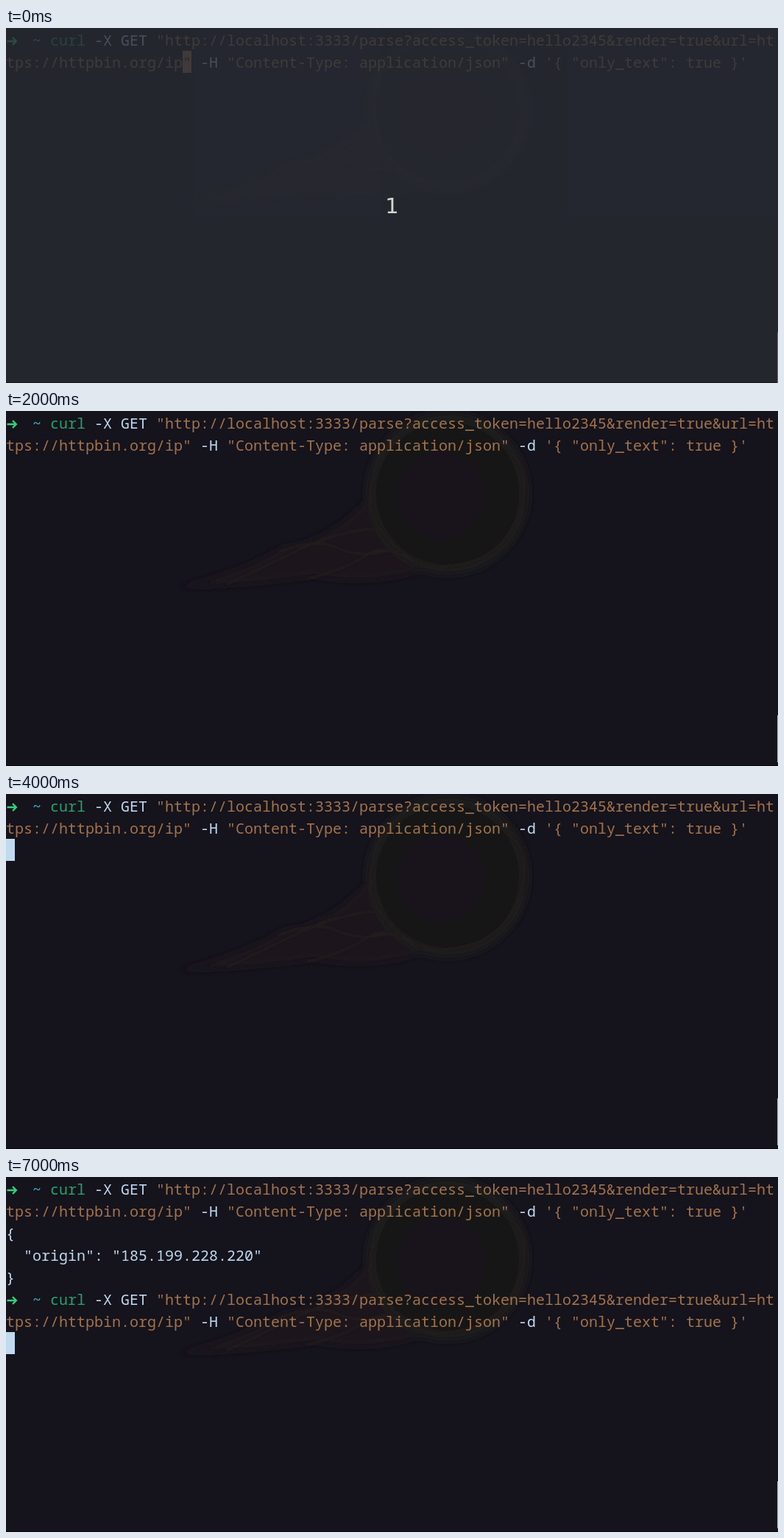
These frames come from a looping animation (1049x483 px, 8 s). An HTML page:

```html
<!DOCTYPE html>
<html lang="en">
<head>
<meta charset="utf-8">
<title>Terminal session</title>
<style>
  html, body { margin: 0; width: 100%; height: 100%; overflow: hidden; background: #15131c; }
  svg { display: block; width: 1049px; height: 483px; }
  text { font: 500 20px "Noto Sans Mono", "DejaVu Sans Mono", monospace; white-space: pre; font-variant-ligatures: none; }
  .count { font: 29px "DejaVu Sans", sans-serif; }
</style>
</head>
<body>
<svg id="stage" viewBox="0 0 1049 483">
  <defs>
    <filter id="soft" x="-20%" y="-20%" width="140%" height="140%"><feGaussianBlur stdDeviation="5"/></filter>
    <filter id="wisp" x="-20%" y="-20%" width="140%" height="140%"><feGaussianBlur stdDeviation="1.3"/></filter>
  </defs>
  <rect width="1049" height="483" fill="#15131c"/>
  <!-- faint wallpaper -->
  <g filter="url(#soft)">
    <path d="M235 240Q330 215 375 185Q440 180 505 105Q505 170 570 215Q500 240 420 225Q330 238 235 240Z" fill="#1d191c"/>
    <circle cx="600" cy="112" r="104" fill="#141217" stroke="#1f1b1c" stroke-width="14"/>
  </g>
  <g filter="url(#wisp)" fill="none" stroke="#211c1c" stroke-width="3">
    <path d="M300 236Q350 212 400 188T500 160M370 192Q420 172 450 186T520 190M410 228Q460 216 490 196T560 212"/>
    <path d="M504 85Q478 130 520 175T600 211Q675 205 697 140T680 55"/>
  </g>
  <circle cx="591" cy="115" r="60" fill="#19131b"/>
  <g id="term"></g>
  <rect y="482" width="1049" height="1" fill="#08070b"/>
  <rect x="1048" y="414" width="1" height="64" fill="#b5b4b2"/>
</svg>
<script>
const LOOP = 8000, CELL = 12, ROW = 30;
const C = {
  bg: '#15131c', fg: '#c0daf0', arrow: '#33d17a', path: '#33b9cc',
  cmd: '#26a269', str: '#a2734c', veil: '#282c34'
};
const stage = document.getElementById('stage');
const term = document.getElementById('term');

function add(parent, tag, attrs, content = '') {
  const el = document.createElementNS('http://www.w3.org/2000/svg', tag);
  for (const k in attrs) el.setAttribute(k, attrs[k]);
  el.textContent = content;
  parent.append(el);
  return el;
}

// Visible only between two times, with hard cuts.
function during(el, from, to) {
  const steps = [[0, from === 0], [from, true], [to, false], [LOOP, to === LOOP]];
  el.animate(
    steps.filter(([t], i) => !(i === 1 && t === 0) && !(i === 2 && t === LOOP))
      .map(([t, on]) => ({ offset: t / LOOP, opacity: on ? 1 : 0, easing: 'step-end' })),
    { duration: LOOP, iterations: Infinity });
  return el;
}

function write(parent, col, row, fill, str) {
  return add(parent, 'text', { x: col * CELL, y: 24 + row * ROW, fill }, str);
}

function block(parent, col, row, fill = C.fg) {
  return add(parent, 'rect', { x: col * CELL, y: 1 + row * ROW, width: CELL, height: ROW, fill });
}

function prompt(parent, row) {
  const y = 18 + row * ROW;
  add(parent, 'path', {
    d: `M1.5 ${y}H14M9 ${y - 4.8}L14 ${y}L9 ${y + 4.8}`,
    fill: 'none', stroke: C.arrow, 'stroke-width': 2.3, 'stroke-linejoin': 'round'
  });
  write(parent, 3, row, C.path, '~');
}

function command(parent, row) {
  write(parent, 5, row, C.cmd, 'curl');
  write(parent, 10, row, C.fg, '-X GET');
  write(parent, 17, row, C.str, '"http://localhost:3333/parse?access_token=hello2345&render=true&url=ht');
  write(parent, 0, row + 1, C.str, 'tps://httpbin.org/ip"');
  write(parent, 22, row + 1, C.fg, '-H');
  write(parent, 25, row + 1, C.str, '"Content-Type: application/json"');
  write(parent, 58, row + 1, C.fg, '-d');
  write(parent, 61, row + 1, C.str, `'{ "only_text": true }'`);
}

prompt(term, 0);
command(term, 0);

const reply = during(add(term, 'g'), 6000, LOOP);
['{', '  "origin": "185.199.228.220"', '}'].forEach((s, i) => write(reply, 0, i + 2, C.fg, s));
prompt(reply, 5);
command(during(add(term, 'g'), 7000, LOOP), 5);

// Cursor: column, row, start, end
[[84, 1, 1000, 2000], [0, 2, 4000, 6000], [5, 5, 6000, 7000], [0, 7, 7000, LOOP]]
  .forEach(([col, row, from, to]) => during(block(term, col, row), from, to));

// Countdown veil before the session starts
const intro = during(add(stage, 'g'), 0, 1000);
block(intro, 20, 1, C.str);
write(intro, 20, 1, C.bg, '"');
add(intro, 'rect', { width: 1049, height: 483, fill: C.veil, 'fill-opacity': 0.8 });
add(intro, 'rect', { x: 1048, y: 414, width: 1, height: 69, fill: '#4a7a5c' });
add(intro, 'rect', { y: 482, width: 1048, height: 1, fill: '#17181e' });
add(intro, 'text', { class: 'count', x: 524.5, y: 252, 'text-anchor': 'middle', fill: '#d3d7cf' }, '1');
</script>
</body>
</html>
```
